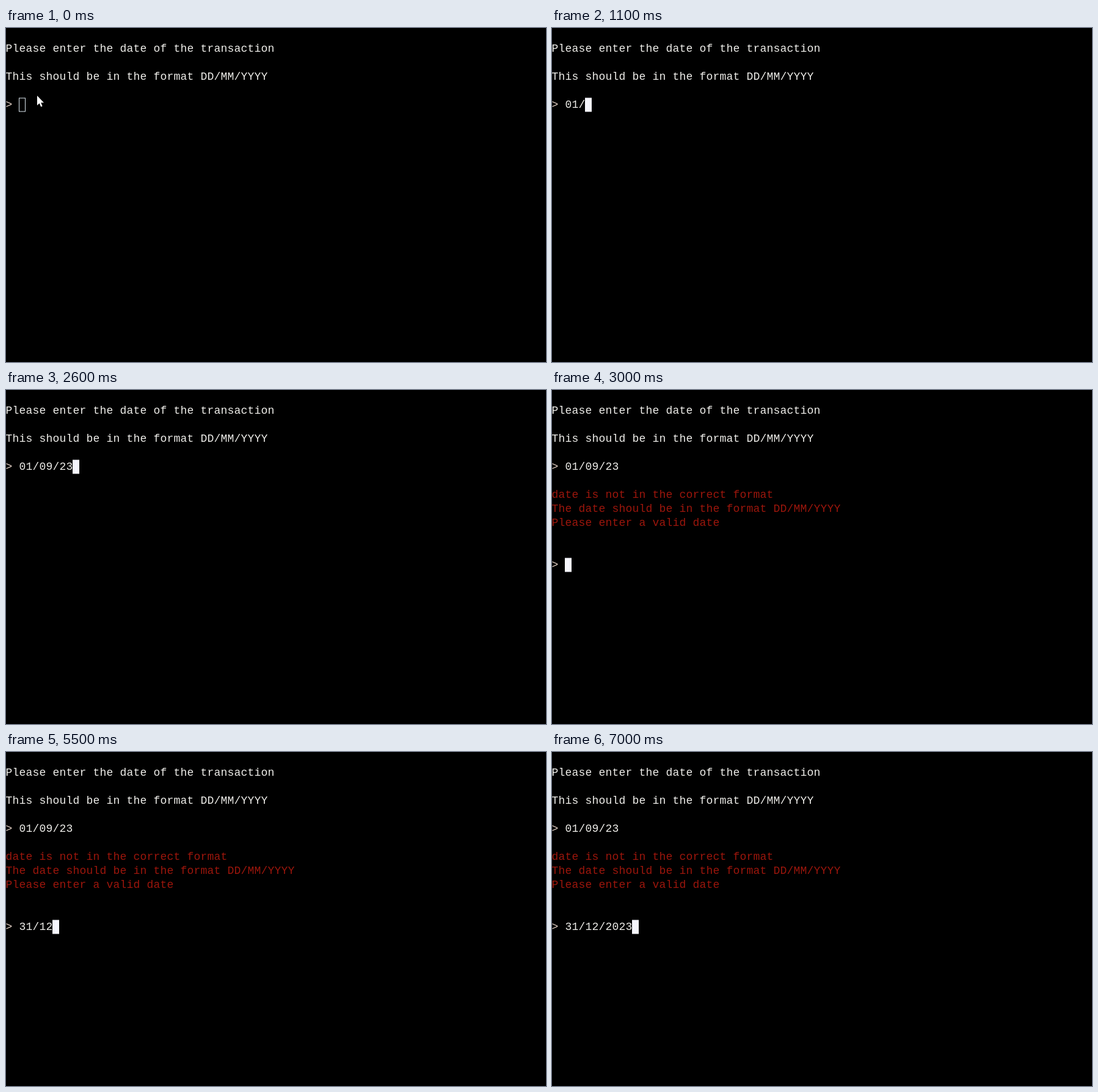
An HTML page for the animation above (8 s loop, 884 px wide and 548 px high).

```html
<!DOCTYPE html>
<html lang="en">
<head>
<meta charset="utf-8">
<title>Terminal date prompt</title>
<style>
  html, body { margin: 0; width: 100%; height: 100%; overflow: hidden; background: #000; }
  svg { display: block; width: 884px; height: 548px; background: #000; }
  text {
    font: 18px "Liberation Mono", "Courier New", monospace;
    letter-spacing: 0.2px;
    white-space: pre;
    fill: #efeeea;
  }
  .error { fill: #9c160c; }
  .mark { fill: #dfcdc2; }
</style>
</head>
<body>
<svg id="stage" viewBox="0 0 884 548" xmlns="http://www.w3.org/2000/svg"></svg>
<script>
const LOOP = 8000;
const CELL = { w: 11, h: 23 };
const ENTER_AT = 3000;
const stage = document.getElementById('stage');

// [time, text typed so far]
const firstEntry = [
  [100, '0'], [200, '01'], [1100, '01/'], [1600, '01/0'], [1700, '01/09'],
  [2000, '01/09/'], [2500, '01/09/2'], [2600, '01/09/23']
];
const secondEntry = [
  [4500, '3'], [4600, '31'], [4900, '31/'], [5500, '31/12'], [6200, '31/12/'],
  [6600, '31/12/2'], [6700, '31/12/20'], [6800, '31/12/202'], [7000, '31/12/2023']
];

function add(tag, attrs, parent = stage) {
  const node = document.createElementNS('http://www.w3.org/2000/svg', tag);
  for (const key in attrs) node.setAttribute(key, attrs[key]);
  return parent.appendChild(node);
}

const colX = col => col * CELL.w - 1;
const rowY = row => row * CELL.h - 0.5;

function print(row, words, attrs = {}, col = 0, parent = stage) {
  const node = add('text', { x: colX(col) + 0.5, y: rowY(row) + 16.5, ...attrs }, parent);
  node.textContent = words;
  return node;
}

print(1, 'Please enter the date of the transaction');
print(3, 'This should be in the format DD/MM/YYYY');
print(5, '>', { class: 'mark' });
const firstInput = print(5, '', {}, 2);

const reply = add('g', {});
[
  'date is not in the correct format',
  'The date should be in the format DD/MM/YYYY',
  'Please enter a valid date'
].forEach((line, i) => print(7 + i, line, { class: 'error' }, 0, reply));
print(12, '>', { class: 'mark' }, 0, reply);
const secondInput = print(12, '', {}, 2, reply);

const block = add('rect', { width: CELL.w, height: CELL.h, fill: '#f6f6fd' });

// Shown until the terminal gets focus
const idle = add('g', {});
add('rect', {
  x: colX(2) + 0.5, y: rowY(5) + 0.5, width: CELL.w - 1, height: CELL.h - 1,
  fill: 'none', stroke: '#dce6ee'
}, idle);
add('path', {
  d: 'M51 111V127L54.6 123.6L57.2 129.2L59.6 128.2L57.2 122.6H62Z', fill: '#fff'
}, idle);

function typed(entry, t) {
  let words = '';
  for (const [time, value] of entry) if (t >= time) words = value;
  return words;
}

const show = (node, on) => node.setAttribute('visibility', on ? 'visible' : 'hidden');

function draw(t) {
  const answered = t >= ENTER_AT;
  const focused = t >= firstEntry[0][0];
  firstInput.textContent = typed(firstEntry, t);
  secondInput.textContent = typed(secondEntry, t);
  const current = answered ? secondInput : firstInput;
  block.setAttribute('x', colX(2 + current.textContent.length));
  block.setAttribute('y', rowY(answered ? 12 : 5));
  show(block, focused);
  show(idle, !focused);
  show(reply, answered);
}

const start = performance.now();
function tick() {
  draw((performance.now() - start) % LOOP);
  requestAnimationFrame(tick);
}
tick();
</script>
</body>
</html>
```
